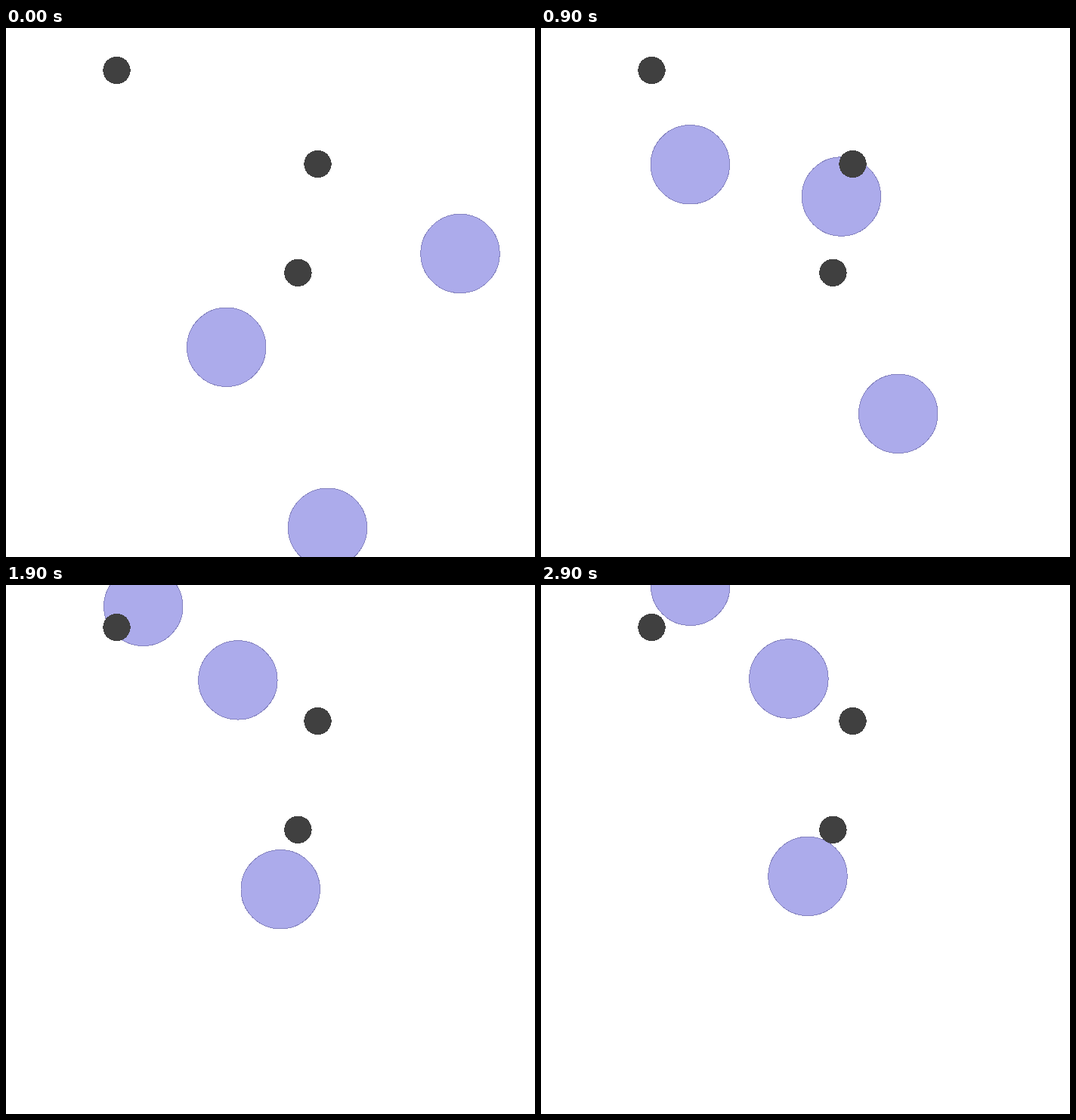
Recreate the animation shown at these times as an HTML page. Size 700 by 700 pixels, loop 3 s.

```html
<!DOCTYPE html>
<html lang="en">
<head>
<meta charset="utf-8">
<title>Drifting discs</title>
<style>
  html, body { margin: 0; width: 100%; height: 100%; overflow: hidden; background: #fff; }
  svg { display: block; width: 700px; height: 700px; shape-rendering: crispEdges; }
  .disc { fill: #acabeb; stroke: #8583c0; stroke-width: 1; }
  .dot { fill: #404040; }
</style>
</head>
<body>
<svg viewBox="0 0 700 700">
  <g id="discs"></g>
  <g class="dot">
    <circle cx="146.5" cy="56" r="18.2"/>
    <circle cx="412.5" cy="180" r="18.2"/>
    <circle cx="386.4" cy="323.8" r="18.2"/>
  </g>
</svg>
<script>
const LOOP = 3000, STEP = 100;

// Key points of the three glides, all passed at the same steps
const steps = [0, 4, 7, 11, 15, 18, 23, 29];
const glides = [
  { x: [291.7, 234, 203, 196, 183.8, 181, 190, 197.7],
    y: [422.3, 331, 242, 126.3, 62, 35, 11.5, 1.3] },
  { x: [601, 522.8, 442, 361.6, 319.5, 308, 312.4, 327.9],
    y: [298.5, 278.3, 252, 192.5, 148.7, 130, 118.4, 124] },
  { x: [425.5, 452.5, 467.4, 469.5, 423.8, 374, 344, 353],
    y: [661.3, 615.8, 555, 471, 432.2, 409, 385.5, 385.4] }
];

// Slope at key i of the parabola through it and its neighbours
function slope(v, i) {
  const m = Math.min(Math.max(i, 1), v.length - 2);
  const h1 = steps[m] - steps[m - 1], h2 = steps[m + 1] - steps[m];
  const s1 = (v[m] - v[m - 1]) / h1, s2 = (v[m + 1] - v[m]) / h2;
  return s1 + (s2 - s1) / (h1 + h2) * (2 * steps[i] - steps[m - 1] - steps[m]);
}

// Cubic Hermite curve through the keys
function glide(v, t) {
  let i = 0;
  while (i < v.length - 2 && t >= steps[i + 1]) i++;
  const h = steps[i + 1] - steps[i], u = (t - steps[i]) / h, w = 1 - u;
  return w * w * ((1 + 2 * u) * v[i] + u * h * slope(v, i))
       + u * u * ((1 + 2 * w) * v[i + 1] - w * h * slope(v, i + 1));
}

const discs = glides.map(() => {
  const c = document.createElementNS('http://www.w3.org/2000/svg', 'circle');
  c.setAttribute('class', 'disc');
  c.setAttribute('r', 52.2);
  return document.getElementById('discs').appendChild(c);
});

function draw(ms) {
  const t = Math.floor((ms % LOOP) / STEP);
  discs.forEach((c, i) => {
    c.setAttribute('cx', glide(glides[i].x, t));
    c.setAttribute('cy', glide(glides[i].y, t));
  });
}

const start = performance.now();
function tick() {
  draw(performance.now() - start);
  requestAnimationFrame(tick);
}
tick();
</script>
</body>
</html>
```
